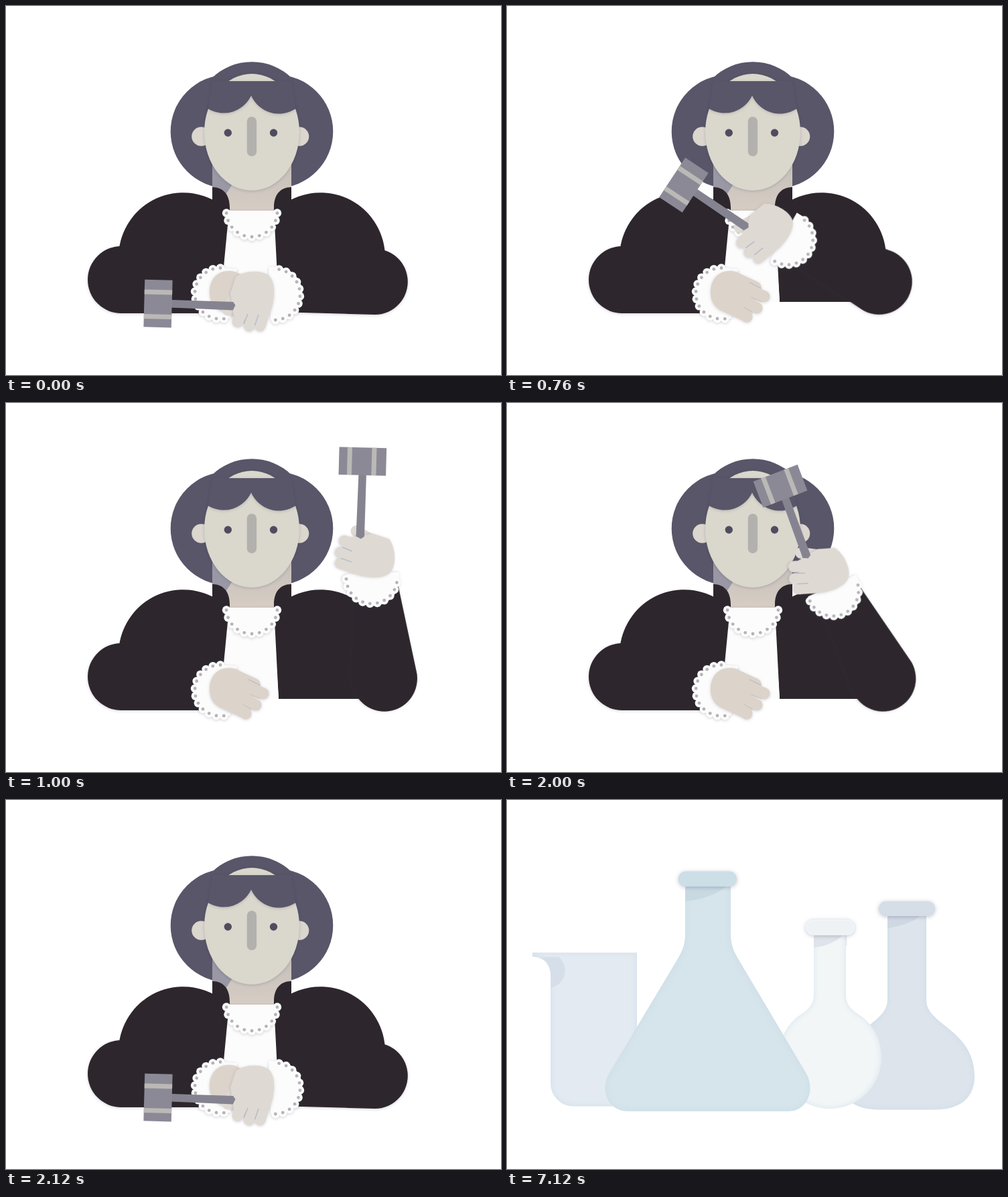
An HTML page that plays this animation: 739x550 px, repeating every 8 s.

```html
<!DOCTYPE html>
<html lang="en">
<head>
<meta charset="utf-8">
<title>Judge, swab and flasks</title>
<style>
  html, body { margin: 0; width: 100%; height: 100%; overflow: hidden; background: #fff; }
  svg { display: block; width: 739px; height: 550px; }
  .robe { fill: #2d272d; }
  .hair { fill: #595669; }
  .lace { fill: #fcfcfc; }
  .bead { fill: #b5b3b6; }
  .skinL { fill: #dcd3ca; stroke: #dcd3ca; }
  .skinR { fill: #dedad3; stroke: #dedad3; }
  .finger { stroke-width: 17; stroke-linecap: round; }
  .soft { filter: drop-shadow(0 1px 2px rgba(50, 50, 80, .22)); }
  .lift { filter: drop-shadow(0 1px 3px rgba(80, 80, 120, .35)); }
  .glass { filter: url(#rim); }
</style>
</head>
<body>
<svg viewBox="0 0 739 550" xmlns="http://www.w3.org/2000/svg">
  <defs>
    <filter id="rim" x="-5%" y="-5%" width="110%" height="110%" color-interpolation-filters="sRGB">
      <feFlood flood-color="#c4d9e4" flood-opacity=".6"/>
      <feComposite in2="SourceAlpha" operator="out"/>
      <feGaussianBlur stdDeviation="4"/>
      <feComposite in2="SourceAlpha" operator="in" result="edge"/>
      <feMerge><feMergeNode in="SourceGraphic"/><feMergeNode in="edge"/></feMerge>
    </filter>
    <linearGradient id="neck" x1="0" y1="0" x2="0" y2="1">
      <stop offset=".3" stop-color="#c9c3bd"/><stop offset="1" stop-color="#d7cdc4"/>
    </linearGradient>
  </defs>

  <g id="judge">
    <g class="hair">
      <circle cx="330" cy="187" r="84.3"/>
      <circle cx="404" cy="187" r="84.3"/>
      <circle cx="367" cy="168.7" r="85.5"/>
    </g>
    <path fill="url(#neck)" d="M308 230H426V306H308Z"/>
    <path fill="#9a98a5" d="M308 230H345V255L326 284H308Z"/>
    <path class="robe" d="M308 270C325 270 334 282 334 300V305L321 441H168V374A96.4 96.4 0 0 1 308 288.6Z"/>
    <path class="robe" transform="matrix(-1 0 0 1 734 0)" d="M308 270C325 270 334 282 334 300V305L327 441H168V374A96.4 96.4 0 0 1 308 288.6Z"/>
    <path class="lace" d="M333 305H398L407 441H320Z"/>
    <g class="soft" id="collar"><path class="lace" d="M328 305H406A39 39 0 0 1 328 305Z"/></g>

    <circle cx="291.5" cy="194.5" r="14.3" fill="#dbd6ce"/>
    <circle cx="438" cy="194.5" r="14.3" fill="#dbd6ce"/>
    <ellipse class="soft" cx="367" cy="188" rx="71" ry="87" fill="#dad7cc"/>
    <path class="hair soft" d="M301.5 153A45.3 45.3 0 0 0 366 133.5A45.3 45.3 0 0 0 432.5 153L426 112H308Z"/>
    <rect x="359.7" y="165" width="14.4" height="59" rx="7.2" fill="#b3b1ae"/>
    <circle cx="331.3" cy="189" r="5.7" fill="#504c60"/>
    <circle cx="399.5" cy="189" r="5.7" fill="#504c60"/>

    <path class="robe soft" d="M172 358L305 384V458H172A50 50 0 0 1 172 358Z"/>
    <g class="soft" id="cuffL"><path class="lace" d="M345 392L320 390A38 38 0 0 0 320 466H335Z"/></g>
    <g class="skinL soft">
      <path stroke="none" d="M304 426C304 402 323 390 344 397L372 412L368 455L350 468L318 453C308 447 304 438 304 426Z"/>
      <path class="finger" d="M340 405L371 419M346 418L384 433M340 433L373 450M333 444L358 463"/>
    </g>
    <path d="M362 412L380 421" stroke="#bdbcc6" stroke-width="1.3"/>
    <path d="M364 434L380 441M354 449L367 457" stroke="#cbc3bf" stroke-width="1.2"/>

    <g id="arm">
      <path class="robe soft" d="M540 363.2L405 392V456L551 460A49 49 0 1 0 540 363.2Z"/>
      <g class="soft" id="cuffR"><path class="lace" d="M392 389H403A39 39 0 0 1 403 468H395Z"/></g>
      <path class="skinR finger" d="M350 420L331 453"/>
      <g class="skinR soft">
        <path stroke="none" d="M335 428L343 404C356 394 386 392 395 405C403 417 400 440 396 452L387 479L370 470L340 462Z"/>
        <path class="finger" d="M356 440L346 470.5M371 440L363 476.5M387 440L379 476.5"/>
      </g>
      <path d="M361 459L355 474M377 460L371.5 476" stroke="#b9bccb" stroke-width="1.6"/>
      <g transform="rotate(1.5 227 443.5)">
        <path fill="#868391" d="M247 437.5L339 438L342.5 443L339 450.5L247 449Z"/>
        <rect x="206.3" y="408.3" width="41.4" height="70.6" fill="#8c8997"/>
        <path fill="#bab9b5" d="M206.3 423H247.7V430H206.3ZM206.3 459.5H247.7V466.5H206.3Z"/>
      </g>
    </g>
  </g>

  <g id="swab">
    <path fill="#a4ceea" d="M244 190H251.3L250.4 484H242.8Z"/>
    <g fill="#cbe1f3" id="tip"><ellipse cx="247.2" cy="149.5" rx="16" ry="47.5"/></g>
    <path fill="#ebf0f2" d="M463 461.5A138 23.5 0 0 1 601 485H463Z"/>
    <rect class="soft" x="321" y="165" width="142" height="320" fill="#b5b9c8"/>
    <path fill="#a6a8b6" d="M321 173H418L321 220Z"/>
    <path fill="#cfced9" d="M463 244H409A17 17 0 0 0 392 261V397A17 17 0 0 0 409 414H463Z"/>
    <rect class="soft" x="310" y="150" width="164.5" height="23" fill="#bbbdc9"/>
    <rect class="soft" x="300" y="81.5" width="184" height="73.5" fill="#cfced9"/>
    <path fill="#b6b9c7" d="M300 81.5H484A152 152 0 0 1 300 81.5Z"/>
  </g>

  <g id="flasks">
    <path class="glass" fill="#e3eaf2" d="M38 227.5H194V456.5H99A34 34 0 0 1 65 422.5V262C65 245 55 234 38 233.5Z"/>
    <path fill="#d6dfe9" d="M46 234H77C91 244 92 273 65.5 280V260C65 246 57 237 46 234Z"/>

    <path class="glass" fill="#dde4ec" d="M568 165H626V298C626 336 698 342 698 412C698 447 672 461.5 640 461.5H554C522 461.5 496 447 496 412C496 342 568 336 568 298Z"/>
    <path fill="#cfd8e2" d="M568 172H618Q600 187 568 191Z"/>
    <rect class="lift" x="555" y="151" width="84" height="22" rx="11" fill="#d5dee7"/>

    <path class="glass" fill="#f2f6f7" d="M458 190H506V290C506 308 518 315 530 323A77 77 0 1 1 434 323C446 315 458 308 458 290Z"/>
    <path fill="#dfe3ea" d="M458 200H503Q486 217 458 220Z"/>
    <path d="M506.7 201V217" stroke="#dadde6"/>
    <rect class="lift" x="446.5" y="179" width="72" height="22" rx="11" fill="#eef2f5" stroke="#f9fbfc"/>

    <path class="glass" fill="#d6e4eb" d="M266 120H334V200C334 218 340 228 347 240L447 408C461 434 447 464 420 464H180C152 464 138 434 152 408L253 240C260 228 266 218 266 200Z"/>
    <path fill="#c8d9e2" d="M266 128H328Q306 147 266 151Z"/>
    <rect class="lift" x="256" y="106.5" width="87" height="22.5" rx="11" fill="#ccdee6"/>
  </g>
</svg>
<script>
  const byId = id => document.getElementById(id);

  function circle(parent, x, y, r, cls) {
    const c = document.createElementNS('http://www.w3.org/2000/svg', 'circle');
    c.setAttribute('cx', x);
    c.setAttribute('cy', y);
    c.setAttribute('r', r);
    if (cls) c.setAttribute('class', cls);
    parent.append(c);
  }

  // Scalloped lace edge with beads along an arc, angles in degrees.
  function lace(id, cx, cy, r, from, to, count) {
    const spots = Array.from({ length: count }, (_, i) => {
      const a = (from + (to - from) * i / (count - 1)) * Math.PI / 180;
      return [cx + r * Math.cos(a), cy + r * Math.sin(a)];
    });
    spots.forEach(([x, y]) => circle(byId(id), x, y, 6.3, 'lace'));
    spots.forEach(([x, y]) => circle(byId(id), x, y, 2.4, 'bead'));
  }

  lace('collar', 367, 306, 38, 4, 176, 11);
  lace('cuffL', 320, 428.5, 38, 82, 270, 12);
  lace('cuffR', 401, 430, 38, -80, 88, 11);
  for (const y of [127, 149.5, 172])
    for (const x of [232, 262.3]) circle(byId('tip'), x, y, 12.2);

  const LOOP = 8000, STEP = 30, RAISED = 90;
  const scenes = [['judge', 0, 4120], ['swab', 4120, 7120], ['flasks', 7120, LOOP]];

  // Share of the move still ahead, in whole steps.
  function remaining(t, start, steps, power) {
    const n = Math.min(steps, Math.floor((t - start) / STEP) + 1);
    return Math.pow(1 - n / steps, power);
  }

  function armAngle(t) {
    if (t < 700) return 0;
    if (t < 2000) return RAISED * (1 - remaining(t, 700, 11, 1.38));
    return RAISED * remaining(t, 2000, 5, 1.28);
  }

  function draw(t) {
    for (const [id, from, to] of scenes)
      byId(id).style.display = t >= from && t < to ? '' : 'none';
    const a = armAngle(t);
    byId('arm').setAttribute('transform',
      `translate(${551 + a * 0.155} 411) rotate(${a}) translate(-551 -411)`);
  }

  const begin = performance.now();
  function tick() {
    draw((performance.now() - begin) % LOOP);
    requestAnimationFrame(tick);
  }
  tick();
</script>
</body>
</html>
```
